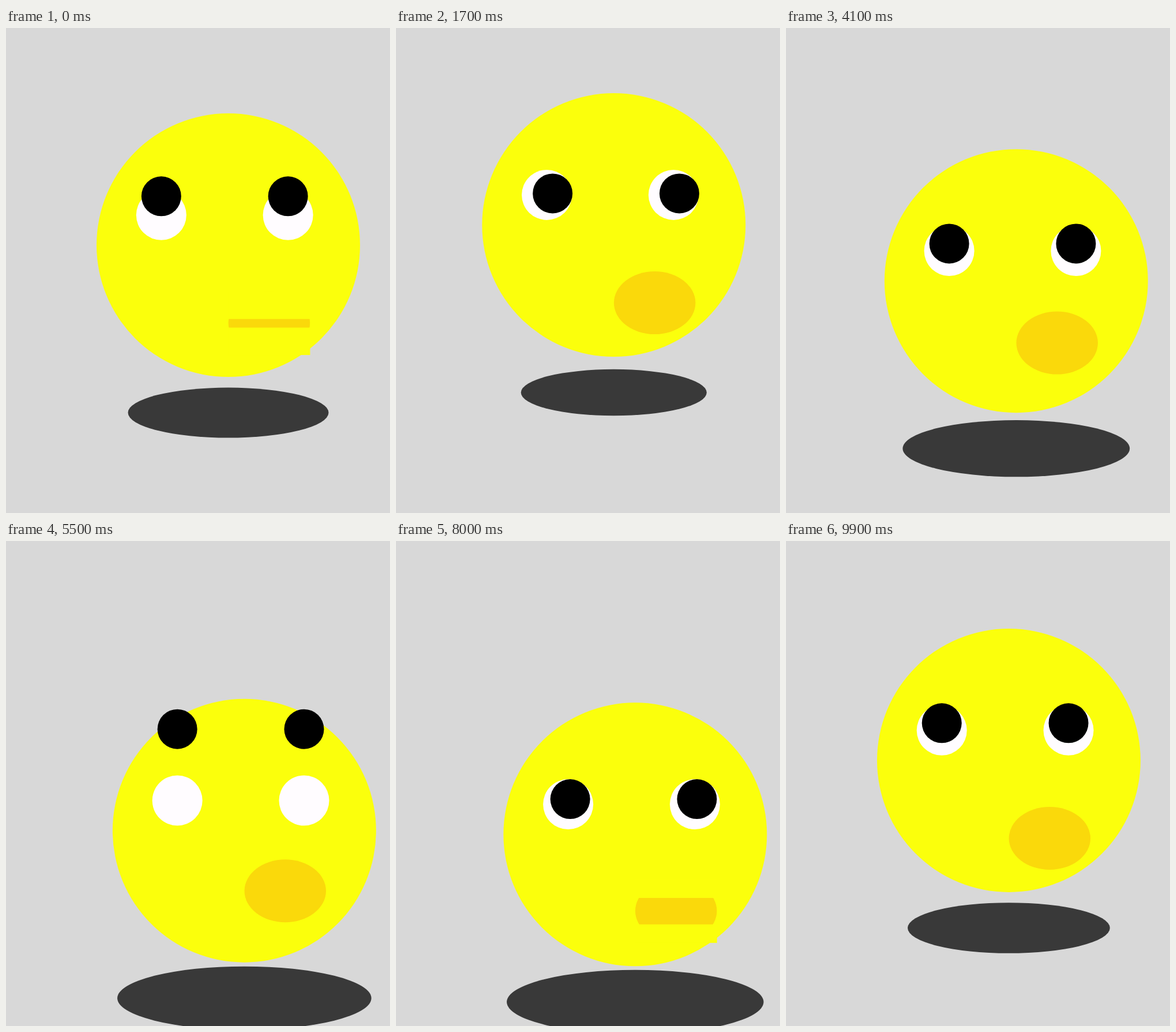
Animation of 666 by 841 pixels, one loop 10 s. Source, as an HTML page:

```html
<!DOCTYPE html>
<html lang="en">
<head>
<meta charset="utf-8">
<title>Floating face</title>
<style>
  html, body { margin: 0; width: 100%; height: 100%; overflow: hidden; background: #d8d8d8; }
  svg { display: block; width: 100%; height: 100%; }
  .skin { fill: #fbff0c; }
</style>
</head>
<body>
<svg viewBox="0 0 666 841">
  <ellipse id="shadow" fill="#393939"/>
  <g id="head">
    <circle class="skin" r="228.5"/>
    <g class="eye" transform="translate(-116.2 -52.2)"></g>
    <g class="eye" transform="translate(103.6 -52.2)"></g>
    <g id="mouth">
      <ellipse rx="70.75" ry="54.5" fill="#fad90b"/>
      <rect class="skin mouth-lid" x="-71" width="142"/>
      <rect class="skin mouth-lid" x="-71" width="142"/>
    </g>
  </g>
</svg>
<script>
const LOOP = 10000, STEP = 100;
const HEAD_R = 228.5, EYE_HALF = 44, MOUTH_HALF = 54.5;
const $ = id => document.getElementById(id);
const all = selector => [...document.querySelectorAll(selector)];

for (const eye of all('.eye')) {
  eye.innerHTML = `<circle r="43.5" fill="#fffcff"/>
    <circle class="pupil" r="34.5"/>
    <rect class="skin eye-lid" x="-44" width="88"/>
    <rect class="skin eye-lid" x="-44" width="88"/>`;
}
const pupils = all('.pupil'), eyeLids = all('.eye-lid'), mouthLids = all('.mouth-lid');

// cubic-bezier(.25, .1, .25, 1)
function ease(x) {
  const bezier = (s, a, b) => 3 * s * (1 - s) * ((1 - s) * a + s * b) + s ** 3;
  let low = 0, high = 1;
  for (let i = 0; i < 24; i++) {
    const mid = (low + high) / 2;
    if (bezier(mid, .25, .25) < x) low = mid; else high = mid;
  }
  return bezier(low, .1, 1);
}

// Eases from 0 to 1 and back, each way in `half` ms, once per period.
function pulse(t, start, half, period = LOOP) {
  const x = ((t - start) % period + period) % period / half;
  return x < 1 ? ease(x) : x < 2 ? 1 - ease(x - 1) : 0;
}

function set(node, attributes) {
  for (const name in attributes) node.setAttribute(name, attributes[name]);
}

// The upper lid hangs from the top, the lower one rises from the bottom.
function closeLids(lids, amount, half) {
  const height = amount && amount * half + 1;
  lids.forEach((lid, i) => set(lid, { y: i % 2 ? half - height + 1 : -half, height }));
}

function draw(t) {
  const drop = pulse(t, 2535, 5000);
  const x = 377.1 + 41.2 * drop, y = 338.5 + 186 * drop;
  set($('head'), { transform: `translate(${x} ${y})` });

  const rx = HEAD_R * (.7 + .3 * drop);
  set($('shadow'), { cx: x, cy: y + 290.5, rx, ry: rx / 4 });

  const up = pulse(t, 4480, 1000, 6000);
  const side = pulse(t, 430, 1100, 6000);
  for (const pupil of pupils) {
    set(pupil, { cx: 12.5 * side, cy: 12.5 * (side - 1 - 9 * up) });
  }
  closeLids(eyeLids, pulse(t, 2500, 600), EYE_HALF);

  const lift = pulse(t, 1700, 3800);
  set($('mouth'), { transform: `translate(70.9 ${135 - 30.5 * lift})` });
  closeLids(mouthLids, pulse(t, 7670, 1000, 8800), MOUTH_HALF);
}

function tick(now) {
  draw(Math.floor(now % LOOP / STEP) * STEP);
  requestAnimationFrame(tick);
}
draw(0);
requestAnimationFrame(tick);
</script>
</body>
</html>
```
